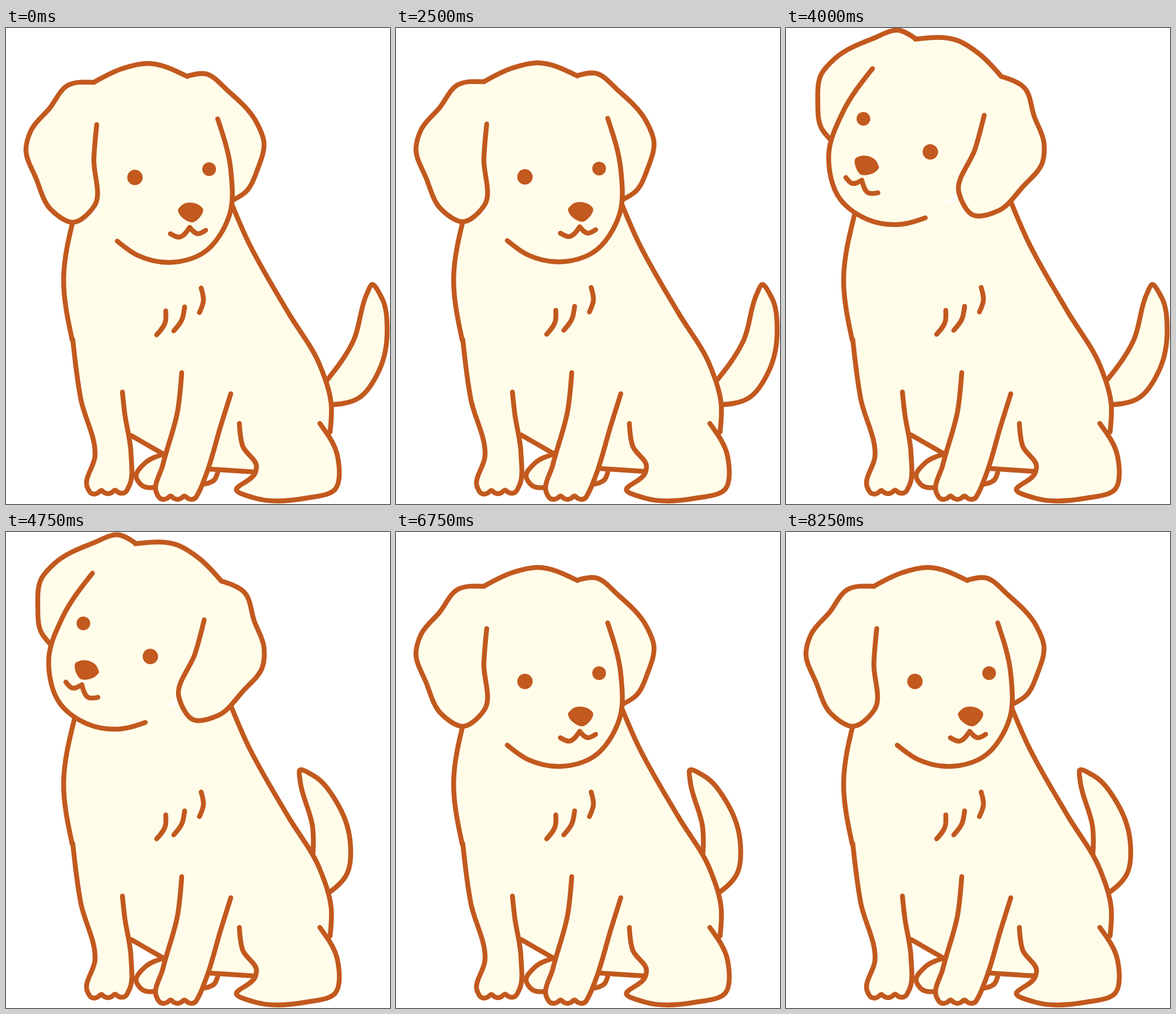
Write an HTML page with a canvas that moves like this. It is 673 px wide and 833 px high and loops after 8.5 s.

```html
<!DOCTYPE html>
<html lang="en">
<head>
<meta charset="utf-8">
<title>Puppy</title>
<style>
html, body { margin: 0; width: 100%; height: 100%; overflow: hidden; background: #fff; }
canvas { display: block; width: 673px; height: 833px; }
</style>
</head>
<body>
<canvas id="stage" width="673" height="833"></canvas>
<script>
const ctx = document.getElementById('stage').getContext('2d');
const INK = '#c2591e', CREAM = '#fffdea';
const STEP = 250, STEPS = 34;

const pts = s => s.split(' ').map(p => p.split(',').map(Number));
const mix = (a, b, t) => a.map((v, i) => v + (b[i] - v) * t);

// Smooth open curve through key points, with tangents weighted by chord length
function curve(p) {
  const last = p.length - 1;
  const h = [], d = [], m = [];
  for (let i = 0; i < last; i++) {
    h[i] = Math.hypot(p[i + 1][0] - p[i][0], p[i + 1][1] - p[i][1]);
    d[i] = p[i].map((v, k) => (p[i + 1][k] - v) / h[i]);
    if (i) m[i] = mix(d[i - 1], d[i], h[i - 1] / (h[i - 1] + h[i]));
  }
  const end = (dir, near) => near ? dir.map((v, k) => (3 * v - near[k]) / 2) : dir;
  m[0] = end(d[0], m[1]);
  m[last] = end(d[last - 1], last > 1 && m[last - 1]);
  const path = new Path2D();
  path.moveTo(...p[0]);
  for (let i = 0; i < last; i++) {
    const s = h[i] / 3, a = p[i], b = p[i + 1];
    path.bezierCurveTo(a[0] + m[i][0] * s, a[1] + m[i][1] * s,
      b[0] - m[i + 1][0] * s, b[1] - m[i + 1][1] * s, ...b);
  }
  return path;
}

const line = s => curve(pts(s));

function polygon(s) {
  const path = new Path2D();
  pts(s).forEach(p => path.lineTo(...p));
  path.closePath();
  return path;
}

// Leg outline: down one side, three scalloped toes, up the other side
function leg(down, up) {
  const a = pts(down), b = pts(up), toes = [];
  for (let i = 1; i < 12; i++) {
    const [x, y] = mix(a[a.length - 1], b[0], i / 12);
    toes.push([x, y + 5 + 6 * Math.abs(Math.sin(i * Math.PI / 4))]);
  }
  return curve([...a, ...toes, ...b]);
}

const head = {
  core: polygon('155,96 248,66 319,86 372,160 390,250 300,400 200,374 156,312'),
  lines: [
    line('155,96 205,72 248,63 319,86'),
    line('160,170 155,230 156,312 119,341 80,319 54,265 36,212 45,180 77,142 110,101 155,96'),
    line('319,85 350,81 390,111 440,166 453,200 442,248 421,288 399,302'),
    line('372,160 395,250 393,327 346,395 292,411 232,399 196,374')
  ],
  nose: line('302,319 312,309 338,310 346,317 329,341 305,327 302,319'),
  mouth: [line('289,361 304,367 323,350'), line('323,350 337,361 351,355')]
};

const body = {
  core: polygon('118,330 110,440 117,547 145,705 218,712 281,749 360,773 437,778 569,708 553,592 485,490 392,290'),
  side: line('121,328 102,440 117,547'),
  back: line('387,285 424,372 495,498 551,591 571,660 569,708'),
  legL: leg('118,546 132,650 157,750 144,806', '216,804 220,745 209,675 205,638'),
  legR: leg('309,604 302,670 276,765 265,815', '338,815 350,787 378,695 395,641'),
  hind: line('410,693 416,733 440,770 438,779 405,810 435,823 525,824 578,808 582,750 551,693'),
  feet: [line('281,746 245,762 229,786 240,802 265,805'), line('372,779 366,792 350,799')],
  belly: [line('220,714 281,749'), line('360,773 437,778')],
  chest: [line('281,496 280,516 265,538'), line('314,489 309,512 295,531'), line('343,456 347,478 340,499')]
};

const tail = line('555,628 610,548 634,465 642,450 659,472 669,530 655,600 620,648 560,661');

const stroke = path => ctx.stroke(path);

function fill(path, color = CREAM) {
  ctx.fillStyle = color;
  ctx.fill(path);
}

function shape(path) {
  fill(path);
  stroke(path);
}

function lifted(dy, draw) {
  ctx.save();
  ctx.translate(0, dy);
  draw();
  ctx.restore();
}

// Move one point onto another, turning everything about it
function turn(from, to, degrees) {
  ctx.translate(...to);
  ctx.rotate(degrees * Math.PI / 180);
  ctx.translate(-from[0], -from[1]);
}

function eye(x, y, r, blink) {
  ctx.beginPath();
  if (blink) ctx.ellipse(x, y + 4, r, r * 0.77, -0.1, 0, Math.PI * 2);
  else ctx.arc(x, y, r, 0, Math.PI * 2);
  ctx.fillStyle = INK;
  ctx.fill();
}

function drawTail(wag) {
  ctx.save();
  if (wag) turn([642, 451], [516, 419], -31);
  shape(tail);
  ctx.restore();
}

function drawBody(dy) {
  body.feet.forEach(shape);
  [body.core, body.side, body.back].forEach(p => fill(p));
  lifted(dy, () => body.belly.forEach(stroke));
  [body.legL, body.legR].forEach(shape);
  stroke(body.side);
  shape(body.hind);
  stroke(body.back);
  lifted(dy, () => body.chest.forEach(stroke));
}

function drawHead(pose, blink) {
  ctx.save();
  if (pose === 'tilt') turn([100, 246], [137, 160], 19.9);
  if (pose !== 'right') ctx.transform(-1, 0, 0, 1, 457, -1);
  [head.core, ...head.lines].forEach(p => fill(p));
  head.lines.forEach(stroke);
  eye(227, 262.5, 13.5, blink);
  eye(357, 248, 12, blink);
  fill(head.nose, INK);
  head.mouth.forEach(stroke);
  ctx.restore();
}

// Faces right, then looks left and cocks the head every two steps
function poseAt(n) {
  if (n < 13 || n > 26) return 'right';
  return (n - 13) % 4 < 2 ? 'left' : 'tilt';
}

function render(now) {
  const n = Math.floor(now / STEP) % STEPS;
  const wag = n % 2 === 1;
  const dy = wag || n === 0 ? 0 : -1;
  ctx.fillStyle = '#fff';
  ctx.fillRect(0, 0, 673, 833);
  ctx.strokeStyle = INK;
  ctx.lineWidth = 8.5;
  ctx.lineCap = ctx.lineJoin = 'round';
  ctx.save();
  ctx.translate(-1, -1);
  drawTail(wag);
  drawBody(dy);
  lifted(dy, () => drawHead(poseAt(n), n % 17 === 6));
  ctx.restore();
}

const start = performance.now();
function loop() {
  render(performance.now() - start);
  requestAnimationFrame(loop);
}
loop();
</script>
</body>
</html>
```
